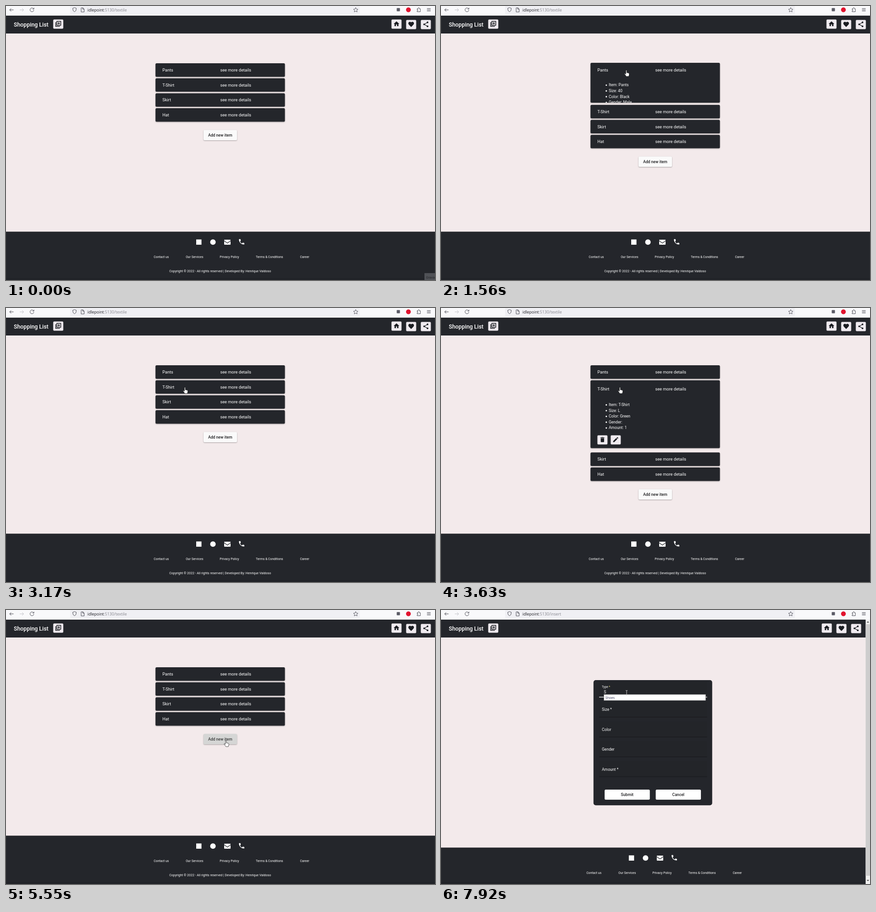
Animation of 936 by 598 pixels, one loop 8 s. Source, as an HTML page:

```html
<!DOCTYPE html>
<html lang="en">
<head>
<meta charset="utf-8">
<title>Shopping List</title>
<style>
html, body { margin: 0; width: 100%; height: 100%; overflow: hidden; background: #f3eaeb; }
#stage { display: block; width: 936px; height: 598px; font-family: Roboto, sans-serif; }
.raised { filter: drop-shadow(0 1px 1px rgba(0,0,0,.32)); }
.bold { font-weight: 500; }
.mid { text-anchor: middle; }
.url { font-family: "Open Sans", sans-serif; font-size: 8.7px; }
</style>
</head>
<body>
<svg id="stage" viewBox="0 0 936 598"></svg>
<script>
const LOOP = 8000, DARK = '#24262b', PAPER = '#f3eaeb';
const stage = document.getElementById('stage');
const $ = id => document.getElementById(id);

// Markup helpers
const rect = (x, y, w, h, fill, r = 0, more = '') =>
  `<rect x="${x}" y="${y}" width="${w}" height="${h}" rx="${r}" fill="${fill}" ${more}/>`;
const text = (x, y, size, str, fill = '#fff', more = '') =>
  `<text x="${x}" y="${y}" font-size="${size}" fill="${fill}" ${more}>${str}</text>`;
const line = (d, color, w = 1, more = '') =>
  `<path d="${d}" fill="none" stroke="${color}" stroke-width="${w}" ${more}/>`;
const group = (id, inner, more = '') => `<g id="${id}" ${more}>${inner}</g>`;

const glyphs = {
  home: '<path d="M10 20v-6h4v6h5v-8h3L12 3 2 12h3v8z"/>',
  heart: '<path d="M12 21.3 10.5 20C5.4 15.4 2 12.3 2 8.5 2 5.4 4.4 3 7.5 3c1.7 0 3.4.8 4.5 2.1C13.1 3.8 14.8 3 16.5 3 19.6 3 22 5.4 22 8.5c0 3.8-3.4 6.9-8.5 11.5z"/>',
  share: '<circle cx="18" cy="5" r="3"/><circle cx="6" cy="12" r="3"/><circle cx="18" cy="19" r="3"/>' +
    line('M18 5 6 12l12 7', '#1b1d22', 2),
  addTo: line('M7 3h14v14H7zM3 6v15h15M14 6v8M10 10h8', '#1b1d22', 2.5),
  trash: '<path d="M6 19q0 2 2 2h8q2 0 2-2V7H6zM19 4h-3.500l-1-1h-5l-1 1H5v2h14z"/>',
  pencil: '<path d="M3 17.250V21h3.750L17.800 9.900 14.100 6.200zM20.700 7a1 1 0 0 0 0-1.400l-2.300-2.300a1 1 0 0 0-1.400 0l-1.900 1.800 3.800 3.800z"/>'
};
const iconButton = (cx, cy, name) =>
  rect(cx - 10.9, cy - 9.9, 21.800, 19.800, '#f0ebf0', 2, 'stroke="#b4b0b6" stroke-width=".5"') +
  `<g transform="translate(${cx - 7.4} ${cy - 7.9}) scale(.615)" fill="#1b1d22">${glyphs[name]}</g>`;

function browserBar() {
  const ink = '#4b4b55';
  return rect(0, 0, 936, 21, '#f9f9fb') + rect(140, 0, 632, 18, '#f0f0f4', 2) +
    line('M16.500 8.500H8m3.500-3.500L8 8.500l3.500 3.500', ink) +
    line('M30 8.500h8.500m-3.500-3.500 3.500 3.500-3.500 3.500', '#c4c4ca') +
    line('M60 5.800a4.200 4.200 0 1 0 .8 3.200M61 3.800v3h-3', ink) +
    line('M149.500 3.500 153.500 5q0 6-4 8-4-2-4-8z', ink) +
    line('M164 4h4l2.500 2.500v6.500H164zM167.500 4v3h3', ink) +
    line('M763 3.500l1.500 3.200 3.500.4-2.600 2.400.7 3.500-3.100-1.800-3.100 1.800.7-3.500L758 7.100l3.500-.4z', ink, .9) +
    rect(852.5, 4.500, 7, 7, '#5b5b66', 1) +
    '<circle cx="878" cy="8.200" r="5.200" fill="#e1142f"/>' +
    line('M897 6h2q0-2.500 1.500-2.500T902 6h2v6.500h-7v-2.200q2 0 2-1.200t-2-1.200z', ink) +
    line('M918.500 5.500h8m-8 2.700h8m-8 2.700h8', ink) +
    `<text class="url" x="177.800" y="11.700" fill="#1c1c22">idlepoint<tspan fill="#85858d">:5130/<tspan id="path"></tspan></tspan></text>`;
}

const navBar = () => rect(0, 21, 936, 39, DARK) +
  text(17, 45, 12.35, 'Shopping List', '#fff', 'class="bold"') + iconButton(114, 39.500, 'addTo') +
  group('tools', iconButton(852, 39.500, 'home') + iconButton(884, 40.500, 'heart') + iconButton(916, 40.500, 'share'));

function footer() {
  const links = [['Contact us', 338.8], ['Our Services', 411.3], ['Privacy Policy', 487.4],
    ['Terms &amp; Conditions', 574.8], ['Career', 651.6]];
  return group('footer', rect(-10, 492.500, 960, 140, DARK) +
    rect(415, 509.500, 11.500, 11.500, '#fff') +
    '<circle cx="451.500" cy="515.300" r="6" fill="#fff"/>' +
    rect(476, 510, 14, 11, '#fff', 1.200) + line('M476 512.500l7 5 7-5', DARK, 1.200) +
    '<path transform="translate(506.300 506.900) scale(.65)" fill="#fff" d="M6.600 10.800c1.400 2.800 3.800 5.100 6.600 6.600l2.200-2.200q.5-.5 1-.3 1.700.6 3.600.6 1 0 1 1V20q0 1-1 1C10.600 21 3 13.400 3 4q0-1 1-1h3.500q1 0 1 1 0 1.900.6 3.600.1.600-.3 1z"/>' +
    links.map(([s, x]) => text(x, 550, 6.85, s, '#fff', 'class="mid"')).join('') +
    text(467.2, 580.500, 7, 'Copyright © 2022 - All rights reserved | Developed By: Henrique Valdoso', '#fff', 'class="mid"')) +
    rect(0, 594, 936, 4, '#202227');
}

// List page
const ROW_H = 29.4, HEAD_GROW = 9.8, BODY_H = 110, GAP = 3.3, GAP_GROW = 6.6, LIST_Y = 125;
const items = [
  { name: 'Pants', facts: ['40', 'Black', 'Male', '1'] },
  { name: 'T-Shirt', facts: ['L', 'Green', '', '1'] },
  { name: 'Skirt' }, { name: 'Hat' }
];
const keys = ['Item', 'Size', 'Color', 'Gender', 'Amount'];

function rowBody(item) {
  const facts = [item.name, ...item.facts].map((v, i) => {
    const y = 14.3 + i * 12.6;
    return `<circle cx="34.500" cy="${y + .3}" r="1.600" fill="#fff"/>` + text(39.700, y + 3, 8.6, `${keys[i]}: ${v}`);
  }).join('');
  return facts + iconButton(26, 91, 'trash') + iconButton(55, 91, 'pencil');
}

const listPage = () => group('list', items.map((item, i) =>
  group('row' + i, rect(0, 0, 282.3, ROW_H, DARK, 2.5, `id="card${i}" class="raised"`) +
    group('head' + i, text(15, 18, 9.2, item.name) + text(141.300, 18, 9.2, 'see more details')) +
    (item.facts ? `<svg id="body${i}" width="282" height="0" overflow="hidden">${rowBody(item)}</svg>` : '')
  )).join('') +
  group('add', rect(431, 270.500, 73, 22.500, '#fafafa', 2.5, 'class="raised"') +
    text(467.3, 284.900, 8.6, 'Add new item', '#1d1d1f', 'class="mid bold"') +
    rect(431, 270.500, 73, 22.500, '#7d837d', 2.5, 'id="press"')));

// Form page
const labels = ['Type', 'Size *', 'Color', 'Gender', 'Amount *'], FIELD_STEP = 43.35;
const formPage = () => group('form',
  rect(332.700, 153, 259, 273.300, DARK, 5) +
  labels.map((s, i) => {
    const y = 190 + i * FIELD_STEP;
    return rect(345, y - 34, 235.500, 34, 'rgba(0,0,0,.04)', 2) + rect(345, y, 235.500, 1, '#17181b') +
      (i ? text(351, y - 12.900, 8.6, s) : group('type', text(0, 0, 8.6, 'Type <tspan id="mark">*</tspan>')));
  }).join('') +
  rect(345, 189.500, 235.500, 1.300, '#fff', 0, 'id="focus"') +
  rect(355.800, 174, .8, 9, '#fff', 0, 'id="caret"') +
  group('typed', text(355.300, 181.700, 8.6, 'S') +
    rect(355.500, 184.300, 221.800, 13, '#fff', 0, 'stroke="#8a8a8a" stroke-width=".8"') +
    text(358.800, 193.700, 7.2, 'Shoes', '#2c2c50', 'font-family="Open Sans, sans-serif"')) +
  [['Submit', 357], ['Cancel', 468.5]].map(([s, x]) =>
    rect(x, 392, 98.600, 22, '#fff', 2.5) + text(x + 49.3, 406.100, 8.6, s, '#1d1d1f', 'class="mid bold"')).join('') +
  rect(926.500, 21, 9.500, 577, '#f0f0f0') + rect(926.500, 31, 9.500, 549, '#cdcdcd') +
  '<path d="M928.800 27.500l2.700-3 2.700 3zM928.800 589l2.700 3 2.700-3z" fill="#505050"/>');

const pointer = () => group('pointer',
  '<circle id="ring" r="6.500" fill="#ff0" fill-opacity=".47"/>' +
  group('arrow', '<path d="M0 0v10l2.300-2.200 1.600 3.600 1.600-.7-1.600-3.500h3.200z" fill="#fff" stroke="#111" stroke-width=".6"/>') +
  group('hand', '<path transform="translate(.8 .4)" d="M-1 1.200Q-1 0 0 0t1 1.200v4.300l4 .9q1.300.3 1.300 1.700v2.200L5.200 13.800H0L-3.700 8.700q-.6-1.500.9-1.400L-1 8.800z" fill="#fff" stroke="#111" stroke-width=".7"/>') +
  group('beam', line('M-2-5.500Q0-5.500 0-4.500 0-5.500 2-5.500M0-4.500v9M-2 5.500Q0 5.500 0 4.500 0 5.500 2 5.500', '#d8d8d8', .9)));

stage.innerHTML = rect(0, 0, 936, 598, PAPER) + browserBar() + navBar() + footer() + listPage() + formPage() +
  group('tip', rect(913, 583, 23, 15, '#505257') + text(916.500, 595, 7.2, 'Gravar', '#26282c')) + pointer();

// Motion
const clamp = v => Math.min(1, Math.max(0, v));
function bezier(x1, y1, x2, y2) {
  const at = (a, b, u) => 3 * a * u * (1 - u) ** 2 + 3 * b * u * u * (1 - u) + u ** 3;
  return x => {
    let lo = 0, hi = 1;
    for (let i = 0; i < 20; i++) {
      const m = (lo + hi) / 2;
      if (at(x1, x2, m) < x) lo = m; else hi = m;
    }
    return at(y1, y2, lo);
  };
}
const standard = bezier(.4, 0, .2, 1), swift = bezier(.25, .8, .25, 1);
const run = (t, start, dur, ease) => ease(clamp((t - start) / dur));
const openness = (t, open, close) => run(t, open, 225, standard) - run(t, close, 225, standard);
const within = (t, a, b) => t >= a && t < b;
const show = (id, on) => $(id).setAttribute('display', on ? 'inline' : 'none');
const set = (id, name, v) => $(id).setAttribute(name, v);
const move = (id, x, y, scale = 1) => set(id, 'transform', `translate(${x} ${y}) scale(${scale})`);

const PAGE_AT = 5620, FOCUS_AT = 7370, TYPE_AT = 7915;
const unfolds = [[1484, 2589], [3436, 4589]], SPACING_LAG = 21;
const presses = [[1340, 1480], [2430, 2570], [3300, 3430], [4430, 4570], [5410, 5545], [7330, 7460]];
const trail = [[210, 841, 555], [960, 383, 143], [1030, 385, 142], [1300, 403.5, 139.5], [2720, 403.5, 139.5],
  [3090, 389.5, 172.5], [4700, 389.5, 172.5], [5340, 479, 284], [5690, 479, 284], [6180, 466, 296],
  [6610, 452, 276], [7250, 405, 181], [8000, 405, 181]];

function pointerAt(t) {
  const i = Math.max(1, trail.findIndex(k => k[0] > t));
  const [t0, x0, y0] = trail[i - 1], [t1, x1, y1] = trail[i];
  const u = clamp((t - t0) / (t1 - t0)), e = u * u * (3 - 2 * u);
  return [x0 + (x1 - x0) * e, y0 + (y1 - y0) * e];
}

// Lays out the rows; returns their vertical spans and how far the button is pushed down
function drawList(t) {
  const spans = [];
  let y = LIST_Y - 2 * openness(t, ...unfolds[0]);
  items.forEach((item, i) => {
    const [open, close] = unfolds[i] || [LOOP, LOOP];
    const p = openness(t, open, close), spacing = openness(t, open + SPACING_LAG, close);
    const head = ROW_H + HEAD_GROW * p, h = head + BODY_H * p;
    move('row' + i, 326.2, y);
    set('card' + i, 'height', h);
    move('head' + i, 0, HEAD_GROW * spacing / 2);
    if (item.facts) {
      set('body' + i, 'y', head);
      set('body' + i, 'height', BODY_H * p);
      show('body' + i, p > .001);
    }
    spans.push([y, y + h]);
    y += h + GAP + GAP_GROW * spacing;
  });
  const shift = y - (LIST_Y + 4 * (ROW_H + GAP));
  move('add', 0, shift);
  set('press', 'opacity', .3 * clamp((t - 5410) / 120));
  return { spans, shift };
}

function drawForm(t) {
  const p = run(t, FOCUS_AT, 400, swift);
  move('type', 351, 177.1 - 6.7 * p, 1 - .25 * p);
  set('mark', 'fill', p > .3 ? '#e9e27a' : '#fff');
  const w = 235.5 * run(t, FOCUS_AT, 300, swift);
  set('focus', 'x', 462.75 - w / 2);
  set('focus', 'width', w);
  show('caret', within(t, FOCUS_AT, TYPE_AT));
  show('typed', t >= TYPE_AT);
}

function pointerKind(x, y, onForm, list) {
  if (onForm) {
    const row = (y - 168) / FIELD_STEP;
    return x > 350 && x < 576 && row > 0 && row < 5 && row % 1 < .42 ? 'beam' : 'arrow';
  }
  const onRow = x > 326 && x < 608 && list.spans.some(([a, b]) => within(y, a, b));
  const onAdd = x > 431 && x < 504 && within(y - list.shift, 270.5, 293);
  return onRow || onAdd ? 'hand' : 'arrow';
}

function draw(t) {
  const onForm = t >= PAGE_AT;
  show('list', !onForm);
  show('form', onForm);
  show('tip', t < 70);
  $('path').textContent = onForm ? 'insert' : 'textile';
  move('tools', onForm ? -10.3 : 0, 0);
  move('footer', onForm ? -5.2 : 0, onForm ? 26 : 0);
  const list = drawList(t);
  drawForm(t);

  const [x, y] = pointerAt(t), kind = pointerKind(x, y, onForm, list);
  show('pointer', t >= 210);
  move('pointer', x, y);
  for (const k of ['arrow', 'hand', 'beam']) show(k, k === kind);
  show('ring', presses.some(([a, b]) => within(t, a, b)));
}

const begin = performance.now();
function tick() {
  draw((performance.now() - begin) % LOOP);
  requestAnimationFrame(tick);
}
tick();
</script>
</body>
</html>
```
